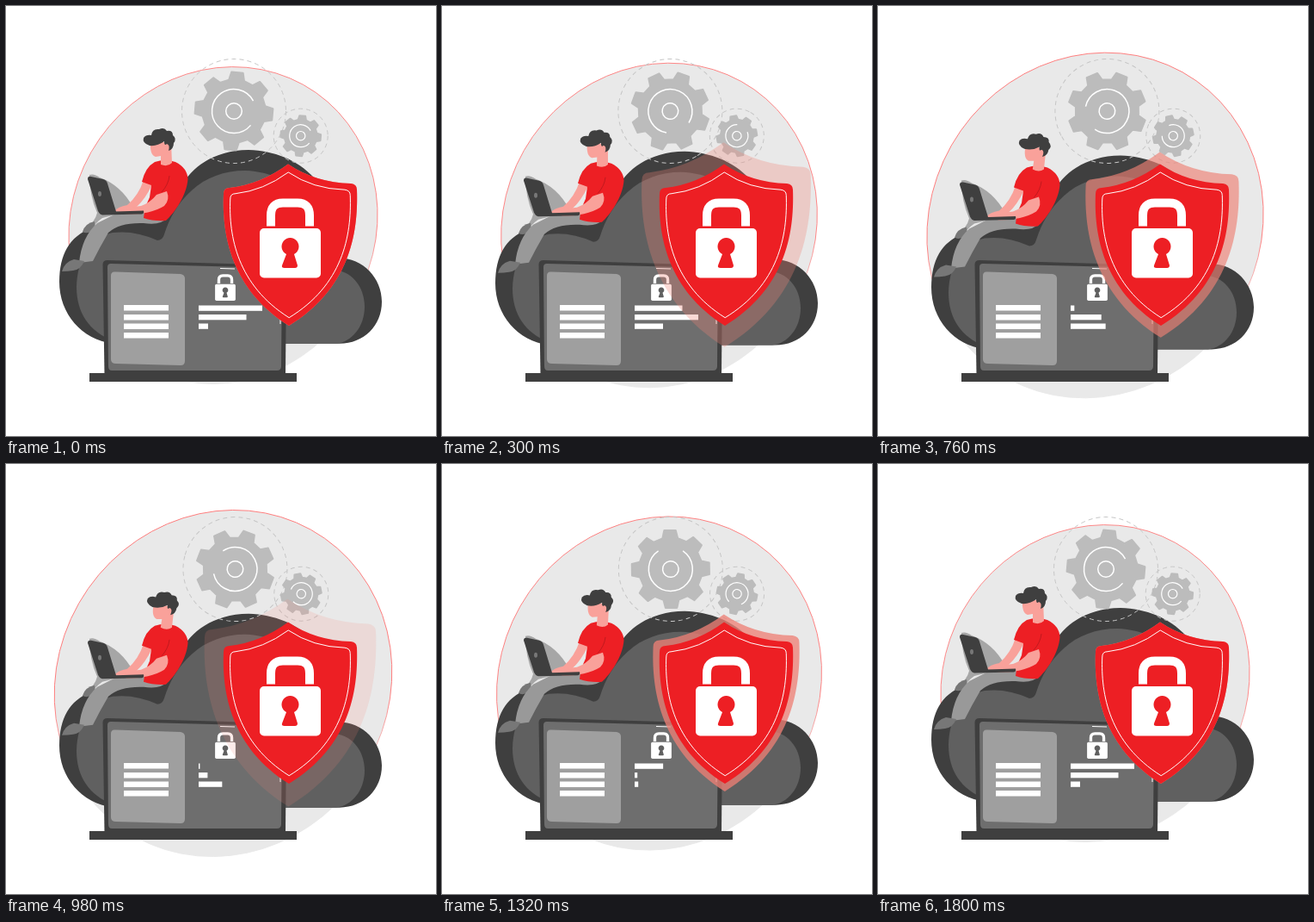
Write an HTML page that moves like this. It is 500 px wide and 499 px high and loops after 1.82 s.

```html
<!DOCTYPE html>
<html lang="en">
<head>
<meta charset="utf-8">
<title>Cloud security</title>
<style>
html, body { margin: 0; width: 100%; height: 100%; overflow: hidden; background: #fff; }
svg { display: block; width: 500px; height: 499px; }
.line { fill: none; stroke: #fff; }
.dash { fill: none; stroke: #c6c6c6; stroke-width: 1; stroke-dasharray: 5 4.1; }
.red { fill: #ed1f24; }
.dark { fill: #3f3f3f; }
.skin { fill: #f9a19a; }
</style>
</head>
<body>
<svg viewBox="0 0 500 499">
  <defs>
    <linearGradient id="rim" gradientUnits="userSpaceOnUse" x1="-110" y1="-150" x2="110" y2="150" gradientTransform="rotate(89)">
      <stop offset=".55" stop-color="#ff7a7a"/><stop offset=".8" stop-color="#e9e9e9"/>
    </linearGradient>
    <path id="shield" d="M328 183.500Q360 205 401 206Q408 207 408 213C410 266 398 329 329 371C262 329 251 266 253 218Q253 211 260 211Q296 207 328 183.500Z"/>
  </defs>

  <g id="disc">
    <ellipse rx="188" ry="175.300" fill="#e9e9e9" stroke="url(#rim)" stroke-width=".8" transform="rotate(-55)"/>
  </g>

  <g id="cloud">
    <path class="dark" d="M124 391.800C88 387 62 357 62 320C62 288 74 268 98 258Q130 246 175 245L205 208C214 190 240 167 282 167C312 168 338 178 358 199L380 293C412 289 437 314 437 343C437 371 416 391.800 388 391.800Z"/>
    <path fill="#606060" d="M124 388C97 378 82 356 82 326C83 293 98 268 124 263Q150 260 176 272Q182 272 184 265C190 246 200 228 216 214C232 199 254 191 278 191C310 192 334 206 346 226L378 306C402 306 417 326 417 349C417 372 402 390 384 391.800H124Z"/>
    <path fill="#a6a6a6" d="M97 196Q102 194 109 199Q134 208 148 234L128 242L112 246Q103 252 98 262L90 262Q104 250 106 240Q97 220 97 196Z"/>
    <path fill="#777" d="M103 250Q92 252 89 262Q95 266 104 258Z"/>
    <path fill="#999" d="M187 246Q180 255 160 252Q132 251 119 263Q109 280 101 296L85 298Q88 268 106 252Q124 243 136 237L160 235Z"/>
    <path fill="#777" d="M65 308Q68 297 79 294L91 296Q87 306 78 307Q72 308 65 308Z"/>
    <path class="skin" d="M160 202L170 207Q162 224 152 233L138 240L126 238Q130 233 141 231Q154 220 160 202Z"/>
    <path class="red" d="M173 181Q185 177 197 181Q211 188 211.500 201C210 220 196 240 186 249Q172 250 160 246Q161 234 167 222L169 208L158 204Q162 187 173 181Z"/>
    <path class="skin" d="M175 219L187 215Q191 225 184 232Q168 242 140 242L132 238Q144 233 157 232Q168 228 175 219Z"/>
    <path d="M190 197Q189 207 181 216" fill="none" stroke="#b5191d" stroke-width=".8"/>
    <path class="dark" d="M95 201Q95 197 99 198L113 201Q117 202 118 206L128 238.500L160 237.500Q161 241 158 241.500L112 242.500Q109 242 107 238Z"/>
    <ellipse cx="109" cy="218" rx="2" ry="3" fill="#777"/>
    <g id="head">
      <path class="skin" d="M168 158Q167 173 174 175L180 174V184Q188 187 193 182L192 158Z"/>
      <path class="dark" d="M167 162Q158 159 160 153Q163 149 169 150Q170 142 178 143Q184 140 187 145Q194 144 194 150Q199 154 195 159Q195 166 189 168Q191 161 187 160Q184 163 184 157Q176 163 167 162Z"/>
    </g>
  </g>

  <g id="bigGear"></g>
  <g id="smallGear"></g>

  <path class="dark" d="M112.500 300Q112.500 295 118 295L258 299L320 301Q326 302 326 308L325 427H114.500Z"/>
  <path fill="#6e6e6e" d="M118 303Q118 299 122 299L318 304Q321 304 321 308L320 418Q320 423 315 423H123Q119 423 119 418Z"/>
  <path fill="#9f9f9f" d="M122 313Q122 308 127 308.500L203 311Q208 312 208 316V412Q208 417 203 417L128 415Q122 415 122 410Z"/>
  <path class="dark" d="M97 426H338V436H97Z"/>
  <path class="line" d="M249 304.500L266 305M319 364V369"/>
  <path d="M137 347h52v6.500h-52zM137 358h52v6.500h-52zM137 368.500h52v6.500h-52zM137 379h52v6.500h-52z" fill="#fff"/>
  <g id="bars" fill="#fff"></g>
  <g id="lock" transform="translate(255 332.500) scale(.335) translate(-330.500 -287)">
    <rect x="295" y="258" width="71" height="57.500" rx="5" fill="#fff"/>
    <path class="line" stroke-width="10" d="M308 255.500V243Q308 228.500 322 228.500H339Q353 228.500 353 243V255.500"/>
    <path d="M326 288A10 10 0 1 1 335 288L339 301Q339 304 336 304H324Q320 304 321 301Z" fill="#606060"/>
  </g>

  <use id="pulse" href="#shield" fill="#ef8075"/>
  <use href="#shield" class="red"/>
  <use href="#shield" class="line" transform="translate(330.500 278) scale(.9) translate(-330.500 -278)" stroke-width="1.100"/>
  <g id="bigLock"></g>
</svg>
<script>
const $ = id => document.getElementById(id);
const T = 1800, LOOP = 1820, STEP = 20, TAU = 2 * Math.PI;

$('bigLock').innerHTML = $('lock').innerHTML.replace('#606060', '#ed1f24');

const at = (r, deg) => {
  const a = deg * TAU / 360;
  return (r * Math.cos(a)).toFixed(2) + ' ' + (r * Math.sin(a)).toFixed(2);
};

function drawGear(id, r, ring, hub, orbit, line) {
  let d = '';
  for (let i = 0; i < 8; i++) {
    const a = i * 45 - 85;
    for (const [k, off] of [[.81, -14], [1, -8.5], [1, 8.5], [.81, 14]])
      d += (d ? 'L' : 'M') + at(r * k, a + off);
  }
  $(id).innerHTML = `<circle class="dash" r="${orbit}"/>
    <path d="${d}Z" fill="#bcbcbc" stroke="#bcbcbc" stroke-width="2" stroke-linejoin="round"/>
    <g class="line" stroke-width="${line}"><circle r="${hub}"/>
    <path d="M${at(ring, 40)}A${ring} ${ring} 0 1 1 ${at(ring, -28)}"/></g>`;
}
drawGear('bigGear', 45.5, 25.5, 9.3, 60.5, 1.5);
drawGear('smallGear', 23.5, 13, 5.2, 31.5, 1.2);

// [y, half of the longest width, phase]
const rows = [[347.5, 37, 0], [358, 37, 1 / 6], [368.5, 22, 1 / 3]];
$('bars').innerHTML = rows.map(([y]) => `<rect x="224" y="${y}" height="6.300"/>`).join('');

const move = (id, value) => $(id).setAttribute('transform', value);

function draw(now) {
  const t = Math.floor(now % LOOP / STEP) * STEP % T;
  const u = t / T, swing = (1 - Math.cos(TAU * u)) / 2;

  move('disc', `translate(252.5 254.500) scale(${1 + .095 * swing})`);
  move('cloud', `translate(0 ${7 * swing})`);
  move('head', `rotate(${9 * swing} 187 182)`);
  move('bigGear', `translate(${265 + 1.5 * swing} 122) rotate(${360 * u})`);
  move('smallGear', `translate(${342.7 + .6 * swing} 150.700) rotate(${-360 * u})`);

  rows.forEach(([, amp, phase], i) => {
    $('bars').children[i].setAttribute('width', amp * (1 + Math.cos(TAU * (u - phase))));
  });

  const p = u * 3 % 1, size = 1 + .29 * (1 - Math.exp(-10 * p * p));
  move('pulse', `translate(330.5 278) scale(${size}) translate(-330.5 -278)`);
  $('pulse').setAttribute('opacity', Math.min(1, 1.2 * (1 - p) ** 2));
}

const start = performance.now();
(function frame() {
  draw(performance.now() - start);
  requestAnimationFrame(frame);
})();
</script>
</body>
</html>
```
